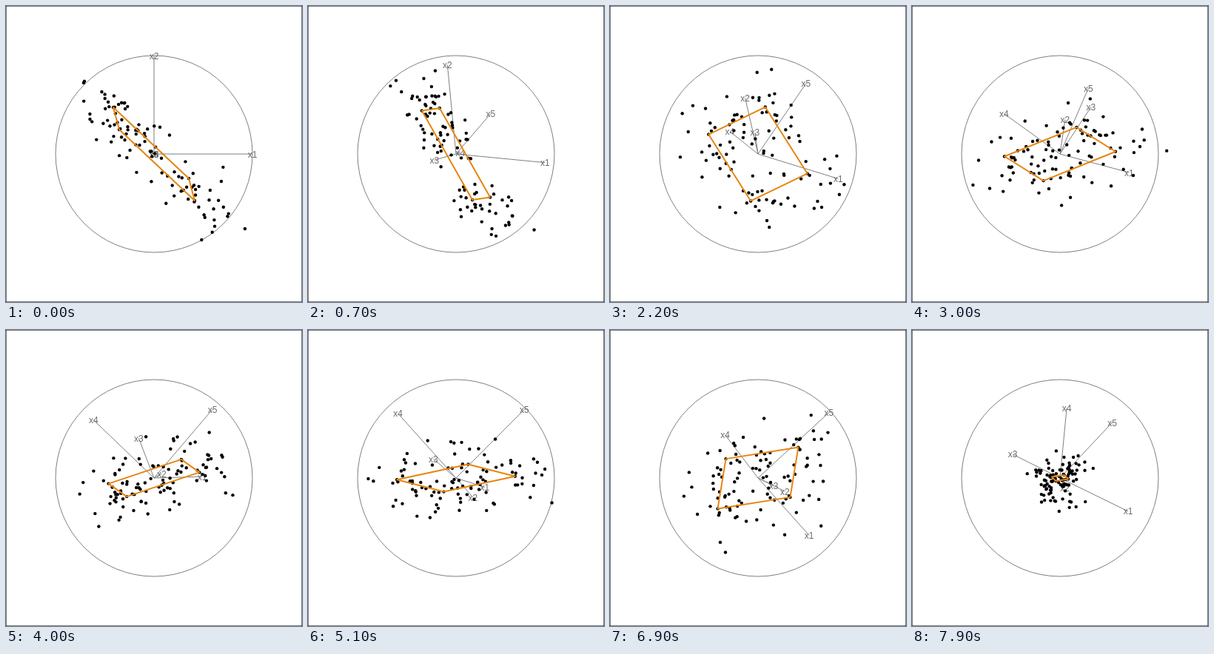
Write an HTML page with a canvas that moves like this. It is 400 by 400 pixels and loops after 8 s.

```html
<!DOCTYPE html>
<html lang="en">
<head>
<meta charset="utf-8">
<title>Grand tour of a plane in five dimensions</title>
<style>
  html, body { margin: 0; width: 100%; height: 100%; overflow: hidden; background: #fff; }
  canvas { display: block; }
</style>
</head>
<body>
<canvas id="stage" width="400" height="400"></canvas>
<script>
const ctx = document.getElementById('stage').getContext('2d');
const SIZE = 400, CENTER = 200, RADIUS = 133;
const LOOP = 8000, STEP = 100, COUNT = 100;

const dot = (a, b) => a.reduce((sum, x, i) => sum + x * b[i], 0);
const mix = (a, b, p, q) => a.map((x, i) => p * x + q * b[i]);

// A basis is a pair of unit vectors; the x5 weight follows from the other four.
const unit = (...v) => [...v, Math.sqrt(1 - dot(v, v))];
const stop = (steps, across, up) => ({ steps, basis: [unit(...across), unit(...up)] });
const tour = [
  stop(0, [1, 0, 0, 0], [0, 1, 0, 0]),
  stop(13, [.695, -.278, -.368, .075], [-.278, .7, -.075, .015]),
  stop(16, [.702, .052, .315, -.568], [-.188, .35, .478, .41]),
  stop(15, [.24, .08, -.445, -.515], [.153, -.167, .315, .65]),
  stop(16, [.277, .318, .465, -.458], [-.651, -.14, -.231, .257]),
  stop(15, [.692, .05, -.481, .068], [-.338, -.1, .241, .707])
];

function slerp(a, b, t) {
  const angle = Math.acos(dot(a, b) / Math.sqrt(dot(a, a) * dot(b, b)));
  return mix(a, b, Math.sin((1 - t) * angle) / Math.sin(angle), Math.sin(t * angle) / Math.sin(angle));
}

// Geodesic between two planes: rotate along their principal directions.
function geodesic([a1, a2], [b1, b2], t) {
  const turn = Math.atan2(dot(a1, b2) + dot(a2, b1), dot(a1, b1) - dot(a2, b2)) / 2;
  const c = Math.cos(turn), s = Math.sin(turn);
  const g = slerp(mix(a1, a2, c, s), mix(b1, b2, c, s), t);
  const h = slerp(mix(a1, a2, -s, c), mix(b1, b2, -s, c), t);
  return [mix(g, h, c, -s), mix(g, h, s, c)];
}

// Each leg ends with one step of rest.
function basisAt(step) {
  let k = 1;
  while (step > tour[k].steps) step -= tour[k++].steps + 1;
  return geodesic(tour[k - 1].basis, tour[k].basis, step / tour[k].steps);
}

// The model rectangle, in pixels, spanned by two half-sides.
const halfLong = [-51, 48, -38, -20.7, 25];
const halfShort = [-4, 15, -29.4, 43.5, -44.1];
const onPlane = (u, v) => mix(halfLong, halfShort, u, v);
const corners = [onPlane(1, 1), onPlane(1, -1), onPlane(-1, -1), onPlane(-1, 1)];

let seed = 29;
const random = () => (seed = seed * 16807 % 2147483647) / 2147483647;
const noise = () => 29 * (random() + random() + random() - 1.5);

// Points spread evenly over the plane, with a sparse band, plus noise in all variables.
const points = Array.from({ length: COUNT }, (_, i) => {
  const s = i / COUNT;
  const u = 1.6 - 2.75 * s - (s > .62 ? .55 : 0);
  const v = 1.6 * (2 * (i * .618 % 1) - 1);
  return onPlane(u, v).map(x => x + noise());
}).concat(corners);

const axes = Array.from({ length: 5 }, (_, i) => halfLong.map((_, j) => i === j ? RADIUS : 0));

function draw(step) {
  const [across, up] = basisAt(step);
  const project = p => [CENTER + dot(p, across), CENTER - dot(p, up)];

  ctx.fillStyle = '#fff';
  ctx.fillRect(0, 0, SIZE, SIZE);
  ctx.lineWidth = 1;
  ctx.strokeStyle = '#000';
  ctx.strokeRect(0, 0, SIZE, SIZE);

  ctx.strokeStyle = '#7f7f7f';
  ctx.beginPath();
  ctx.arc(CENTER, CENTER, RADIUS, 0, 2 * Math.PI);
  for (const axis of axes) {
    ctx.moveTo(CENTER, CENTER);
    ctx.lineTo(...project(axis));
  }
  ctx.stroke();

  ctx.fillStyle = '#6b6b6b';
  ctx.font = '12px "Liberation Sans", Arial, sans-serif';
  ctx.textAlign = 'center';
  axes.forEach((axis, i) => {
    const [x, y] = project(axis);
    ctx.fillText('x' + (i + 1), x, y + 4.5);
  });

  ctx.fillStyle = '#000';
  for (const point of points) {
    ctx.beginPath();
    ctx.arc(...project(point), 2.2, 0, 2 * Math.PI);
    ctx.fill();
  }

  ctx.strokeStyle = '#e6850f';
  ctx.lineWidth = 2;
  ctx.lineJoin = 'round';
  ctx.beginPath();
  corners.forEach(corner => ctx.lineTo(...project(corner)));
  ctx.closePath();
  ctx.stroke();
}

const begin = performance.now();
function tick() {
  draw(Math.floor((performance.now() - begin) % LOOP / STEP));
  requestAnimationFrame(tick);
}
tick();
</script>
</body>
</html>
```
